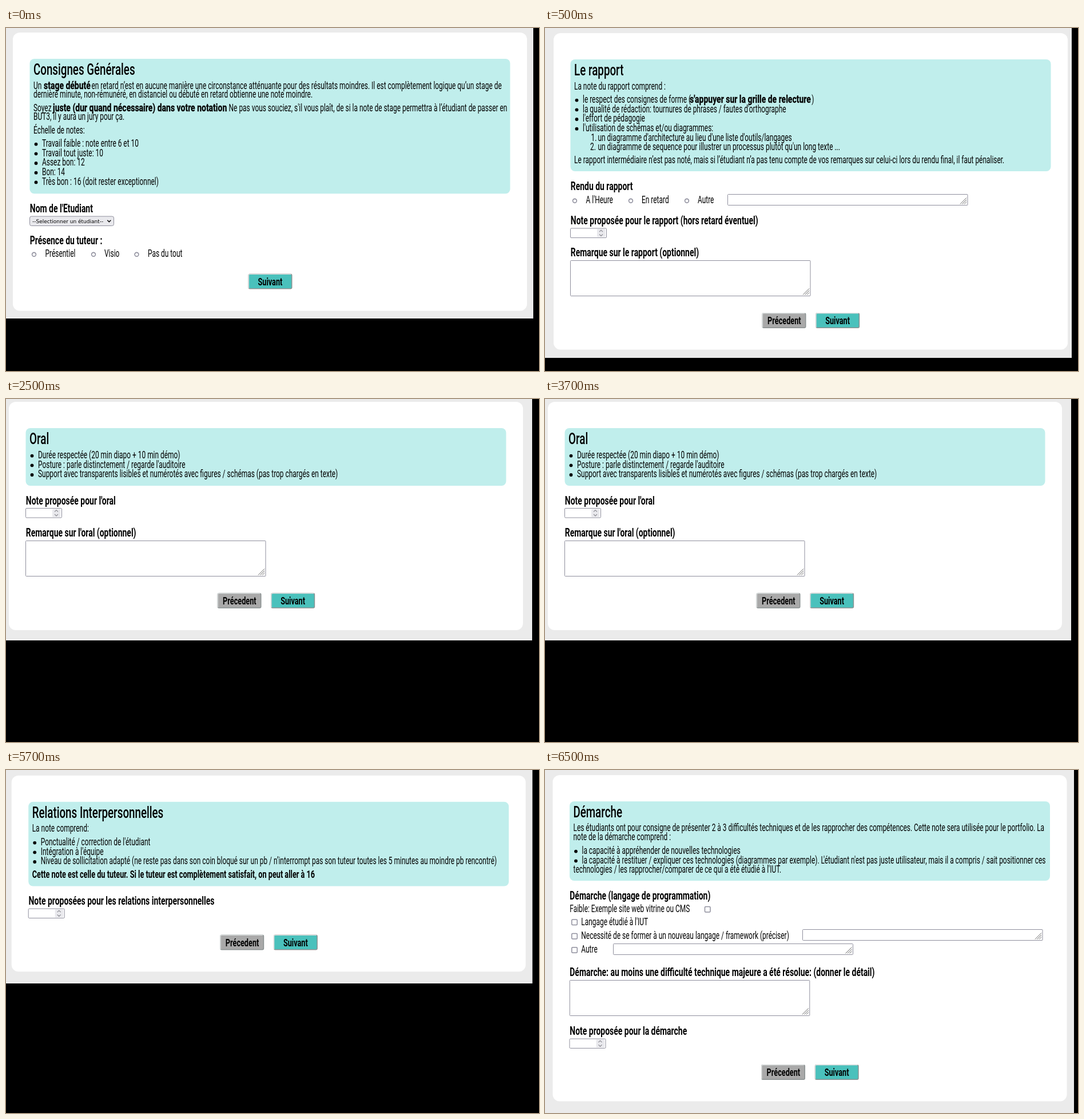
These frames come from a looping animation (932 by 601 pixels, 8000 ms). An HTML page:

```html
<!DOCTYPE html>
<html lang="fr">
<head>
<meta charset="utf-8">
<title>Formulaire de notation</title>
<style>
html, body { margin: 0; width: 100%; height: 100%; overflow: hidden; background: #000; }
svg { display: block; width: 932px; height: 601px; }
text { font-family: Roboto, "Open Sans", sans-serif; fill: #000; }
.select { font-family: "DejaVu Sans", sans-serif; font-size: 9px; }
</style>
</head>
<body>
<svg id="stage" viewBox="0 0 932 601" xmlns="http://www.w3.org/2000/svg"></svg>
<script>
const stage = document.getElementById('stage');
const EDGE = '#8f8f9d', FACE = '#e9e9ed';

// Condensed look: one horizontal scale per text style
const STYLES = {
  body:   { size: 18.2, weight: 400, squeeze: 0.656 },
  medium: { size: 18.2, weight: 600, squeeze: 0.698 },
  strong: { size: 18.2, weight: 700, squeeze: 0.768, bolder: 0.3 },
  label:  { size: 20,   weight: 600, squeeze: 0.698 },
  title:  { size: 27.3, weight: 500, squeeze: 0.687 }
};

let page, left, top0;

function add(tag, attrs, content) {
  const el = document.createElementNS('http://www.w3.org/2000/svg', tag);
  for (const k in attrs) el.setAttribute(k, attrs[k]);
  if (content) el.textContent = content;
  page.appendChild(el);
  return el;
}

function rect(x, y, width, height, fill, rx = 0, stroke = 'none') {
  add('rect', { x, y, width, height, fill, rx, stroke });
}

function line(d, stroke, width = 1) {
  add('path', { d, stroke, fill: 'none', 'stroke-width': width });
}

function text(str, x, y, style = 'body') {
  const s = STYLES[style];
  const attrs = {
    transform: `translate(${x} ${y}) scale(${s.squeeze} 1)`,
    'font-size': s.size, 'font-weight': s.weight
  };
  if (s.bolder) Object.assign(attrs, { stroke: '#000', 'stroke-width': s.bolder });
  add('text', attrs, str);
}

function frame(w, h, cardBottom, boxBottom, title) {
  rect(0, 0, w, h, '#ebebeb');
  rect(left - 29.5, top0, 899, cardBottom - top0, '#fff', 12);
  rect(left, top0 + 46, 840, boxBottom - top0 - 46, '#c0eeec', 8);
  text(title, left + 6.5, top0 + 74, 'title');
}

const para = (str, y, style) => text(str, left + 6.5, y, style);
const label = (str, y) => text(str, left + 0.3, y, 'label');

function bullets(y, items) {
  items.forEach((str, i) => {
    const base = y + i * 16.7;
    add('circle', { cx: left + 11, cy: base - 4.4, r: 2.9 });
    text(str, left + 21.5, base);
  });
}

function radio(cx, cy, str, x) {
  add('circle', { cx, cy, r: 3.4, fill: '#fff', stroke: EDGE, 'stroke-width': 1.6 });
  text(str, x, cy + 4.3);
}

function checkbox(x, y) {
  add('rect', { x, y, width: 9.5, height: 9.5, rx: 1.5, fill: '#fff', stroke: EDGE, 'stroke-width': 1.5 });
}

function area(x, y, w, h) {
  rect(x, y, w, h, '#fff', 1, EDGE);
  const r = x + w - 2, b = y + h - 2;
  line(`M${r - 11} ${b}L${r} ${b - 11}M${r - 7.5} ${b}L${r} ${b - 7.5}M${r - 4} ${b}L${r} ${b - 4}`, '#666');
}

function numberField(y) {
  const x = left;
  rect(x, y, 63, 16.5, '#fff', 1.5, EDGE);
  rect(x + 46.5, y + 1.3, 14.5, 14, FACE, 1);
  line(`M${x + 50.5} ${y + 6.2}l3 -3l3 3m-6 4.2l3 3l3 -3`, '#85858c', 1.1);
}

function button(str, x, y, fill, pad) {
  const w = 77, h = 27;
  rect(x, y, w, h, '#8b9292', 3);
  add('path', { d: `M${x + 3} ${y}h${w - 4}l-2 2H${x + 2}V${y + h - 2}l-2 1V${y + 3}q0 -3 3 -3z`, fill: '#d9dddd' });
  rect(x + 1.5, y + 1.5, w - 3, h - 3, fill, 1.5);
  text(str, x + pad, y + 20, 'medium');
}

const next = (x, y) => button('Suivant', left + x, y, '#4ac1bc', 17);

function navigation(y) {
  button('Précedent', left + 335, y, '#a9a9a9', 9.6);
  next(428.7, y);
}

function general() {
  frame(922, 509, 495.5, 290.3, 'Consignes Générales');
  para('Un', 106.5);
  text('stage débuté', 66, 106.5, 'strong');
  text('en retard n’est en aucune manière une circonstance atténuante pour des résultats moindres. Il est complètement logique qu’un stage de', 149.5, 106.5);
  para('dernière minute, non-rémunéré, en distanciel ou débuté en retard obtienne une note moindre.', 122);
  para('Soyez', 145.5);
  text('juste (dur quand nécessaire) dans votre notation', 82, 145.5, 'strong');
  text(". Ne pas vous souciez, s'il vous plaît, de si la note de stage permettra à l’étudiant de passer en", 383.5, 145.5);
  para('BUT3, il y aura un jury pour ça.', 161.3);
  para('Échelle de notes:', 184.7);
  bullets(208, ['Travail faible : note entre 6 et 10', 'Travail tout juste: 10', 'Assez bon: 12', 'Bon: 14',
    'Très bon : 16 (doit rester exceptionnel)']);
  label("Nom de l'Etudiant", 322.7);
  rect(41.5, 330, 147, 16.5, FACE, 3, EDGE);
  add('text', { x: 46, y: 341.8, class: 'select' }, '--Selectionner un étudiant--');
  line('M177.3 336.7l3 3l3 -3', '#000', 1.4);
  label('Présence du tuteur :', 378.8);
  radio(49, 396.8, 'Présentiel', 68.5);
  radio(153, 396.8, 'Visio', 172);
  radio(228.5, 396.8, 'Pas du tout', 248);
  next(382, 430.5);
}

function report() {
  frame(921, 578, 563.5, 251, 'Le rapport');
  para('La note du rapport comprend :', 107.5);
  bullets(131, ['le respect des consignes de forme (', "la qualité de rédaction: tournures de phrases / fautes d'orthographe",
    "l'effort de pédagogie", "l'utilisation de schémas et/ou diagrammes:"]);
  text("s'appuyer sur la grille de relecture", 253, 131, 'strong');
  text(')', 466.3, 131);
  text('1.', 80.5, 197.8);
  text("un diagramme d'architecture au lieu d'une liste d'outils/langages", 92.5, 197.8);
  text('2.', 79, 214);
  text("un diagramme de sequence pour illustrer un processus plutôt qu'un long texte ...", 92.5, 214);
  para('Le rapport intermédiaire n’est pas noté, mais si l’étudiant n’a pas tenu compte de vos remarques sur celui-ci lors du rendu final, il faut pénaliser.', 237);
  label('Rendu du rapport', 284);
  radio(52, 302.8, "A l'Heure", 71.5);
  radio(150, 302.8, 'En retard', 169);
  radio(248, 302.8, 'Autre', 267);
  area(319.5, 291.5, 419.5, 19);
  label('Note proposée pour le rapport (hors retard éventuel)', 344);
  numberField(351);
  label('Remarque sur le rapport (optionnel)', 400);
  area(left, 407.5, 419.5, 62);
  navigation(499);
}

function oral() {
  frame(920, 423, 405, 152, 'Oral');
  bullets(104, ['Durée respectée (20 min diapo + 10 min démo)', "Posture : parle distinctement / regarde l'auditoire",
    'Support avec transparents lisibles et numérotés avec figures / schémas (pas trop chargés en texte)']);
  label("Note proposée pour l'oral", 184.8);
  numberField(191.5);
  label("Remarque sur l'oral (optionnel)", 240.8);
  area(left, 248.5, 419.5, 62);
  navigation(339.7);
}

function relations() {
  frame(920.5, 374, 353.3, 203.6, 'Relations Interpersonnelles');
  para('La note comprend:', 108.2);
  bullets(132, ["Ponctualité / correction de l'étudiant", "Intégration à l'équipe",
    'Niveau de sollicitation adapté (ne reste pas dans son coin bloqué sur un pb / n’interrompt pas son tuteur toutes les 5 minutes au moindre pb rencontré)']);
  para('Cette note est celle du tuteur. Si le tuteur est complètement satisfait, on peut aller à 16', 189.3, 'medium');
  label('Note proposées pour les relations interpersonnelles', 236);
  numberField(243);
  navigation(288.5);
}

function approach() {
  frame(925, 601, 580.5, 194, 'Démarche');
  para('Les étudiants ont pour consigne de présenter 2 à 3 difficultés techniques et de les rapprocher des compétences. Cette note sera utilisée pour le portfolio. La', 107.3);
  para('note de la démarche comprend :', 123.2);
  bullets(147, ['la capacité à appréhender de nouvelles technologies',
    "la capacité à restituer / expliquer ces technologies (diagrammes par exemple). L'étudiant n'est pas juste utilisateur, mais il a compris / sait positionner ces"]);
  para("technologies / les rapprocher/comparer de ce qui a été étudié à l'IUT.", 180);
  label('Démarche (langage de programmation)', 226.7);
  text('Faible: Exemple site web vitrine ou CMS', left + 0.3, 248.8);
  checkbox(279.5, 239.5);
  ["Langage étudié à l'IUT", 'Necessité de se former à un nouveau langage / framework (préciser)', 'Autre'].forEach((str, i) => {
    const y = 262 + i * 24.4;
    checkbox(46.8, y);
    text(str, 63.3, y + 9.5);
  });
  area(450.5, 279.5, 419.5, 19);
  area(119.5, 304.5, 419, 19);
  label('Démarche: au moins une difficulté technique majeure a été résolue: (donner le détail)', 361);
  area(left + 0.3, 368.5, 419.5, 62);
  label('Note proposée pour la démarche', 464);
  numberField(471);
  navigation(516);
}

const PAGES = [
  { start: 0,    left: 41.5, top: 8,   draw: general },
  { start: 500,  left: 44.5, top: 9,   draw: report },
  { start: 2500, left: 34.5, top: 5,   draw: oral },
  { start: 4500, left: 39.2, top: 9.8, draw: relations },
  { start: 6500, left: 43,   top: 9,   draw: approach }
];
const LOOP = 8000;

for (const p of PAGES) {
  p.node = page = document.createElementNS('http://www.w3.org/2000/svg', 'g');
  left = p.left;
  top0 = p.top;
  p.draw();
  stage.appendChild(p.node);
}

function show(t) {
  const current = PAGES.filter(p => p.start <= t).pop();
  for (const p of PAGES) p.node.setAttribute('display', p === current ? 'inline' : 'none');
}

const begin = performance.now();
function tick() {
  show((performance.now() - begin) % LOOP);
  requestAnimationFrame(tick);
}
tick();
</script>
</body>
</html>
```
